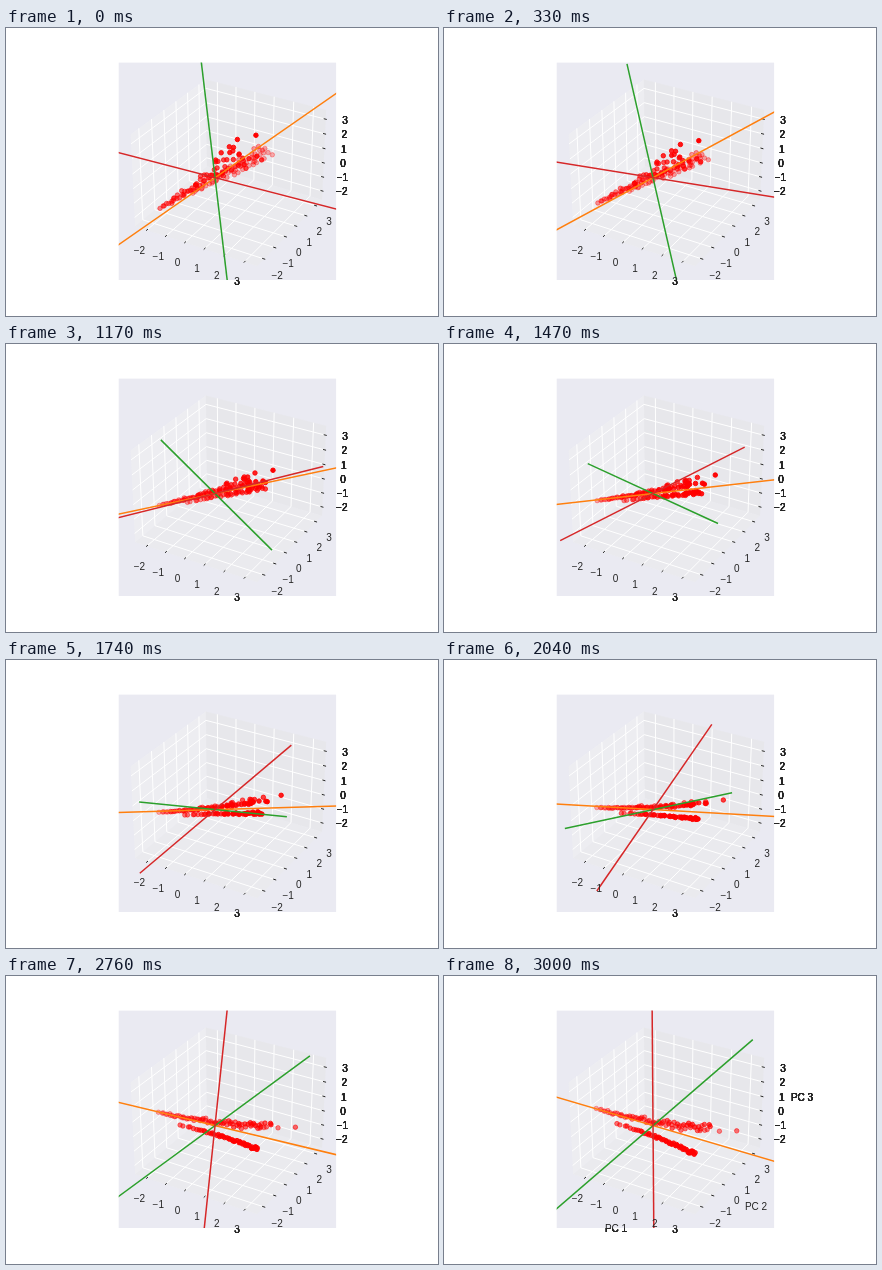
These frames come from a looping animation (432x288 px, 6030 ms). An HTML page with a canvas:

```html
<!DOCTYPE html>
<html lang="en">
<head>
<meta charset="utf-8">
<title>Rotating onto principal components</title>
<style>
  html, body { margin: 0; width: 100%; height: 100%; overflow: hidden; background: #fff; }
  canvas { display: block; width: 432px; height: 288px; }
</style>
</head>
<body>
<canvas id="stage"></canvas>
<script>
const W = 432, H = 288;
const canvas = document.getElementById('stage');
const dpr = window.devicePixelRatio || 1;
canvas.width = W * dpr;
canvas.height = H * dpr;
const ctx = canvas.getContext('2d');
ctx.scale(dpr, dpr);

const STEP = 30, LOOP = 6030, MOVE = 100;
const BOX = [112.7, 34.6, 217.4, 217.4];
const LO = -2.625, HI = 3.625;
const INK = '#262626';

// Perspective camera looking at the middle of a 4:4:3 box
const rad = Math.PI / 180, elev = 30 * rad, azim = -60 * rad;
const [ce, se, ca, sa] = [Math.cos(elev), Math.sin(elev), Math.cos(azim), Math.sin(azim)];
const RIGHT = [-sa, ca, 0], UP = [-se * ca, -se * sa, ce], NEAR = [ce * ca, ce * sa, se];
const UNIT = [4, 4, 3].map(s => s / 21);
const MID = 0.5, DIST = 10, SCALE = 117.5, CX = 224.3, CY = 140.3;

const dot = (a, b) => a[0] * b[0] + a[1] * b[1] + a[2] * b[2];

function project(p) {
  const q = p.map((v, i) => (v - MID) * UNIT[i]);
  const depth = dot(NEAR, q), k = SCALE / (1 - depth / DIST);
  return [CX + k * dot(RIGHT, q), CY - k * dot(UP, q), depth];
}

// Component directions; the cloud turns by the transposed matrix
const AXES = [[0.611, 0.1105, 0.786], [0.55, -0.772, -0.319], [0.569, 0.63, -0.531]];
const COLORS = ['#ff7f0e', '#2ca02c', '#d62728'];
const turn = p => AXES.map(axis => dot(axis, p));
const mix = (a, b, t) => a.map((v, i) => v + (b[i] - v) * t);

let seed = 29;
function rand() {
  seed = (seed * 16807) % 2147483647;
  return seed / 2147483647;
}
const noise = () => rand() + rand() + rand() - 1.5;

// The cloud is two bent arms whose scatter grows along their length,
// mostly along the line of sight of the finished view
const SIGHT = [0.65, -1.125, 1];
const cloud = [];

function addPoint(end) {
  cloud.push({ start: turn(end), end });
}

function addArm(count, from, to, skew, bend, blur, stray) {
  for (let i = 0; i < count; i++) {
    const s = Math.min(1, (i + rand()) / count) ** skew;
    const u = from + (to - from) * s;
    const far = rand() < stray ? -0.6 * rand() : 0;
    const slide = s * (0.3 * noise() + far);
    const p = [u, bend(u), blur * (0.3 + s) * noise()];
    addPoint(p.map((v, k) => v + SIGHT[k] * slide));
  }
}
addArm(76, -3.05, 2.35, 0.85, u => 0.04 + 0.036 * (u + 3.05) ** 2, 0.25, 0.3);
addArm(48, -1.75, 2.85, 0.65, u => -0.65 - 0.025 * (u + 1.7) ** 2, 0.1, 0.15);
addPoint([2.38, 1.87, -0.73]);
addPoint([3.21, 1.95, -0.43]);

function path(points) {
  ctx.beginPath();
  for (const p of points) {
    const [x, y] = project(p);
    ctx.lineTo(x, y);
  }
}

function line(points, color, width = 1) {
  path(points);
  ctx.strokeStyle = color;
  ctx.lineWidth = width;
  ctx.stroke();
}

function pane(points, shade) {
  path(points);
  ctx.fillStyle = `rgba(${shade},${shade},${shade},.5)`;
  ctx.fill();
}

function eachTick(fn) {
  for (let v = -2; v <= 3; v++) fn(v);
}

function drawBox() {
  ctx.fillStyle = '#eaeaf2';
  ctx.fillRect(...BOX);
  pane([[LO, LO, LO], [LO, HI, LO], [LO, HI, HI], [LO, LO, HI]], 242);
  pane([[LO, HI, LO], [HI, HI, LO], [HI, HI, HI], [LO, HI, HI]], 230);
  pane([[LO, LO, LO], [HI, LO, LO], [HI, HI, LO], [LO, HI, LO]], 236);
  eachTick(v => {
    line([[v, LO, LO], [v, HI, LO], [v, HI, HI]], '#fff');
    line([[HI, v, LO], [LO, v, LO], [LO, v, HI]], '#fff');
    line([[LO, LO, v], [LO, HI, v], [HI, HI, v]], '#fff');
  });
  const out = 0.05, inner = 0.1;
  eachTick(v => {
    line([[v, LO - out, LO], [v, LO + inner, LO]], INK);
    line([[HI + out, v, LO], [HI - inner, v, LO]], INK);
    line([[HI + out, HI, v], [HI - inner, HI, v]], INK);
  });
}

function drawLabels(named) {
  const put = (text, x, y) => ctx.fillText(text, x, y + 3.6);
  const tag = (v, p, dx, dy) => {
    const [x, y] = project(p);
    put(String(v).replace('-', '\u2212'), x + dx, y + dy);
  };
  eachTick(v => {
    tag(v, [v, LO, LO], -7.3, 19.8);
    tag(v, [HI, v, LO], 13, 16);
    tag(v, [HI, HI, v], 19.3, 0.8);
  });
  if (named) {
    put('PC 1', 172, 252.6);
    put('PC 2', 312, 230.6);
    put('PC 3', 358, 121.6);
  }
}

function drawText(named) {
  ctx.font = '10px "Liberation Sans", Arial, sans-serif';
  ctx.textAlign = 'center';
  ctx.fillStyle = INK;
  drawLabels(named);
  // Outside the plot the lettering is built up from many passes
  ctx.save();
  ctx.beginPath();
  ctx.rect(0, 0, W, H);
  ctx.rect(...BOX);
  ctx.clip('evenodd');
  for (let i = 0; i < 7; i++) drawLabels(named);
  ctx.restore();
}

function drawCloud(t) {
  const dots = cloud.map(c => project(mix(c.start, c.end, t))).sort((a, b) => a[2] - b[2]);
  const far = dots[0][2], near = dots[dots.length - 1][2];
  ctx.lineWidth = 1;
  for (const [x, y, d] of dots) {
    const alpha = 0.3 + 0.7 * (d - far) / (near - far);
    ctx.fillStyle = ctx.strokeStyle = `rgba(255,0,0,${alpha})`;
    ctx.beginPath();
    ctx.arc(x, y, 2.24, 0, 2 * Math.PI);
    ctx.fill();
    ctx.stroke();
  }
}

function drawAxes(t) {
  AXES.forEach((axis, k) => {
    const unit = [0, 1, 2].map(i => +(i === k));
    const dir = mix(axis, unit, t);
    line([-10, 10].map(s => dir.map(c => c * s)), COLORS[k], 1.5);
  });
}

function draw(step) {
  const t = step / MOVE;
  ctx.fillStyle = '#fff';
  ctx.fillRect(0, 0, W, H);
  drawBox();
  ctx.save();
  ctx.beginPath();
  ctx.rect(...BOX);
  ctx.clip();
  drawCloud(t);
  drawAxes(t);
  ctx.restore();
  drawText(t === 1);
}

let begin = null, shown = -1;
function tick(now) {
  if (begin === null) begin = now;
  const step = Math.min(MOVE, Math.floor(((now - begin) % LOOP) / STEP));
  if (step !== shown) draw(shown = step);
  requestAnimationFrame(tick);
}
draw(0);
requestAnimationFrame(tick);
</script>
</body>
</html>
```
